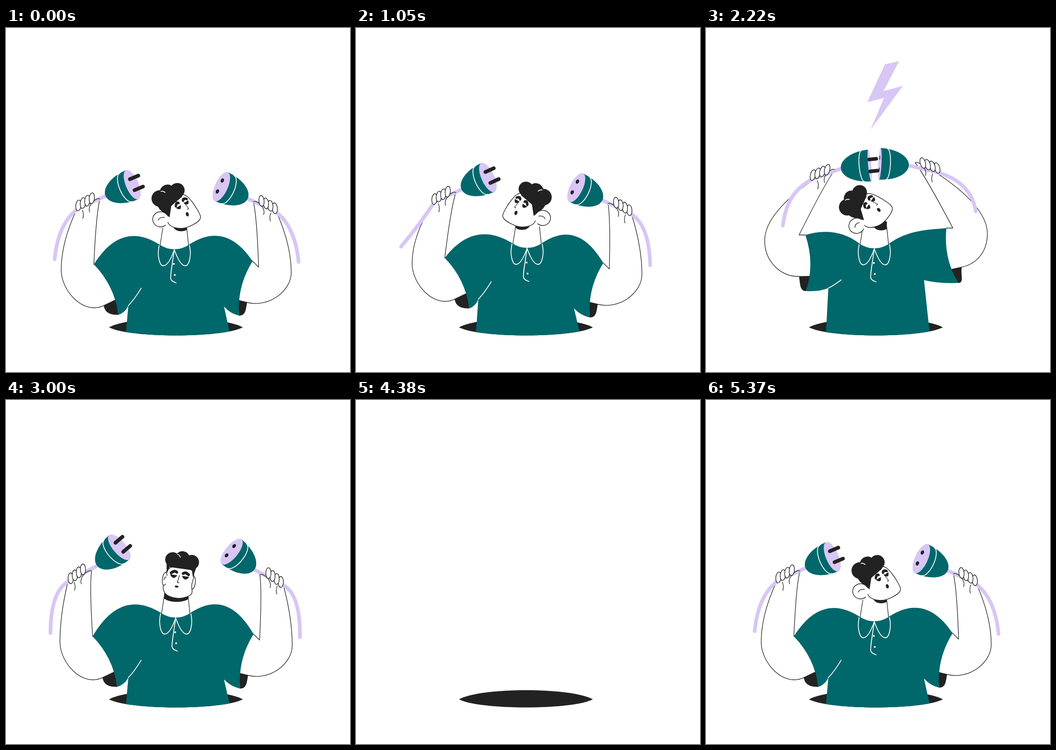
An HTML page with a canvas for the animation above (5.4 s loop, 748 by 748 pixels).

```html
<!DOCTYPE html>
<html lang="en">
<head>
<meta charset="utf-8">
<title>Plug and socket</title>
<style>
html, body { margin: 0; width: 100%; height: 100%; overflow: hidden; background: #fff; }
canvas { display: block; width: 748px; height: 748px; }
</style>
</head>
<body>
<canvas id="stage" width="748" height="748"></canvas>
<script>
const ctx = document.getElementById('stage').getContext('2d');
const TEAL = '#00676b', DARK = '#222222', LILAC = '#d8c6f4', WHITE = '#ffffff';
const LOOP = 5400, STEP = 30, MIRROR = 740, RAD = Math.PI / 180;
const UPPER_ARM = 71, SLEEVE = 122, REACH = 109, WIRE = 141;

// The right side is drawn mirrored, so both arms share one set of rules.
const LEFT = { slack: 0, lean: 26, cuff: 20, hem: 261 };
const RIGHT = { slack: 13, lean: 14, cuff: 10, hem: 254 };

// A hand position, the direction it points the plug, and the swing of the loose wire.
const arm = (x, y, aim, swing) => ({ x, y, aim, swing });
const pose = (left, right, body) => ({ left, right, body: { neck: 473, turn: 0, tilt: 0, drop: 0, width: 1, ...body } });
const vary = (base, change) => Object.fromEntries(Object.keys(base).map(k => [k, { ...base[k], ...change[k] }]));

const lookRight = pose(arm(172, 378, -20, 28), arm(170, 384, -21, 28), { neck: 481, turn: 1 });
const lookLeft = pose(arm(185, 364, -21, 38), arm(160, 388, -22, 25), { neck: 478, turn: -1 });
const joined = pose(arm(248, 314, -8, 35), arm(253, 299, -2, 45), { neck: 479, turn: 1, tilt: -25 });
const apart = pose(arm(154, 378, -32, 24), arm(156, 386, -31, 23), { tilt: 8 });
const facing = pose(arm(180, 365, -24, 34), arm(173, 376, -28, 33), { neck: 468 });
const reach = pose(arm(205, 345, -35, 30), arm(205, 345, -35, 30), { neck: 462, width: 0.95 });
const burst = pose(arm(130, 340, -30, 45), arm(130, 340, -30, 45), { neck: 460 });
const sunk = vary(reach, { body: { drop: 450, width: 0.5 } });

const TIMELINE = [
  [0, lookRight],
  [120, lookRight],
  [420, vary(lookRight, { body: { turn: 0.5 }, right: { x: 160, swing: 41 } })],
  [750, vary(lookLeft, { left: { swing: 51 } })],
  [1050, lookLeft],
  [1170, vary(lookLeft, { left: { swing: 32 } })],
  [1590, joined],
  [1800, vary(joined, { body: { neck: 477 }, left: { x: 240 }, right: { x: 245 } })],
  [2220, joined],
  [2310, joined],
  [2760, vary(apart, { left: { swing: 27 }, right: { swing: 27 } })],
  [3000, apart],
  [3180, apart],
  [3480, facing],
  [3660, reach],
  [3990, sunk],
  [4560, sunk],
  [4800, burst],
  [5040, vary(lookRight, { body: { neck: 484 }, left: { swing: 24 } })],
  [5220, lookRight],
  [LOOP, lookRight]
];

const mix = (a, b, k) => a + (b - a) * k;
const clamp = (v, lo = 0, hi = 1) => Math.max(lo, Math.min(hi, v));
const ease = k => k * k * (3 - 2 * k);
const polar = (x, y, length, degrees) => [x + length * Math.cos(degrees * RAD), y + length * Math.sin(degrees * RAD)];
const blend = (a, b, k) => typeof a === 'number' ? mix(a, b, k)
  : Object.fromEntries(Object.keys(a).map(key => [key, blend(a[key], b[key], k)]));

function poseAt(t) {
  const i = TIMELINE.findIndex(([end]) => end > t);
  const [t0, from] = TIMELINE[i - 1], [t1, to] = TIMELINE[i];
  return blend(from, to, ease((t - t0) / (t1 - t0)));
}

// Everything else about an arm follows from where its hand is.
function joints(hand, side) {
  const { x, y, aim, swing } = hand;
  const raised = clamp((x - 190) / 60);
  const cx = 190 + 0.15 * (x - 165), cy = y + 136;
  const sx = cx + mix(side.slack, 14, raised), sy = cy - side.slack * (1 - raised);
  const slope = side.lean - 26 * raised;
  const [tx, ty] = polar(sx, sy, SLEEVE, 90 - slope);
  const [px, py] = polar(x, y, REACH, aim);
  const [wx, wy] = polar(x, y, WIRE, 90 + swing);
  // A point by the sleeve opening: distance back from the tip, then across.
  const cuff = (back, across) => [
    tx - back * Math.sin(slope * RAD) + across * Math.cos(slope * RAD),
    ty - back * Math.cos(slope * RAD) - across * Math.sin(slope * RAD)
  ];
  return {
    ...side, x, y, cx, cy, sx, sy, tx, ty, px, py, wx, wy,
    ex: cx - UPPER_ARM - 4 * raised, ey: cy + 12,
    kx: 266, ky: ty - 20 + 14 * raised,
    fold: 17 + 48 * Math.sin(slope * RAD),
    bend: cuff(SLEEVE / 2, 20),
    low: cuff(32, -mix(side.cuff, 15, raised)),
    meet: cuff(32, 10),
    angle: Math.min(-3, 1.45 * aim + 6),
    bow: mix(1 - 0.1 * (swing - 27), 1, raised)
  };
}

function fill(color) { ctx.fillStyle = color; ctx.fill(); }
function stroke(color, width) { ctx.strokeStyle = color; ctx.lineWidth = width; ctx.stroke(); }
function ellipse(x, y, rx, ry, rot = 0, from = 0, to = 360) {
  ctx.beginPath();
  ctx.ellipse(x, y, rx, ry, rot * RAD, from * RAD, to * RAD);
}
function line(...points) {
  ctx.beginPath();
  points.forEach(p => ctx.lineTo(...p));
}
function quad(a, b, c) {
  ctx.beginPath();
  ctx.moveTo(...a);
  ctx.quadraticCurveTo(...b, ...c);
}
function smooth(points) {
  const n = points.length, at = i => points[(i + n) % n];
  ctx.beginPath();
  ctx.moveTo(...points[0]);
  for (let i = 0; i < n; i++) {
    const [p, a, b, q] = [at(i - 1), at(i), at(i + 1), at(i + 2)];
    ctx.bezierCurveTo(a[0] + (b[0] - p[0]) / 6, a[1] + (b[1] - p[1]) / 6,
      b[0] - (q[0] - a[0]) / 6, b[1] - (q[1] - a[1]) / 6, b[0], b[1]);
  }
}
function group(draw) { ctx.save(); draw(); ctx.restore(); }
function mirrored(draw) {
  group(() => {
    ctx.translate(MIRROR, 0);
    ctx.scale(-1, 1);
    draw();
  });
}

function drawArm({ x, y, cx, cy, ex, ey, sx, sy, tx, ty, low, meet }) {
  ctx.beginPath();
  ctx.moveTo(...low);
  ctx.bezierCurveTo(low[0] + 3, low[1] + 18, tx - 14, ty, tx, ty);
  ctx.lineTo(...meet);
  fill(DARK);

  const wristX = x - 20, wristY = y + 20, thumbX = x + 32, thumbY = y - 6;
  const dx = meet[0] - low[0], dy = meet[1] - low[1];
  const pull = 0.52 * (low[0] - ex) / Math.hypot(dx, dy);
  const outer = () => {
    ctx.moveTo(wristX, wristY);
    ctx.bezierCurveTo(mix(wristX, ex, 0.55), mix(wristY, ey, 0.3), ex, mix(wristY, ey, 0.66), ex, ey);
    ctx.bezierCurveTo(ex, mix(ey, low[1], 0.6), low[0] - pull * dx, low[1] - pull * dy, ...low);
    ctx.lineTo(...meet);
  };
  const inner = () => {
    ctx.lineTo(sx, sy);
    ctx.lineTo(cx, cy);
    ctx.quadraticCurveTo(mix(thumbX, cx, 0.25) - 5, mix(thumbY, cy, 0.25), thumbX, thumbY);
  };
  ctx.beginPath();
  outer();
  inner();
  ctx.lineTo(x, y);
  fill(WHITE);
  for (const side of [outer, inner]) {
    ctx.beginPath();
    side();
    stroke(DARK, 1.3);
  }
}

function drawShirtHalf({ sx, sy, tx, ty, kx, ky, bend, hem }, nx, ny) {
  const neckX = nx - 32, neckY = ny - 10, lift = ny - 40;
  ctx.beginPath();
  ctx.moveTo(nx + 1, ny);
  ctx.quadraticCurveTo(nx - 18, ny, neckX, neckY);
  ctx.bezierCurveTo(mix(sx, neckX, 0.67), lift, mix(sx, neckX, 0.32), lift, sx, sy);
  ctx.quadraticCurveTo(...bend, tx, ty);
  ctx.quadraticCurveTo((tx + kx) / 2 + 4, (ty + ky) / 2 + 5, kx, ky);
  ctx.lineTo(hem, 660);
  ctx.lineTo(hem, 690);
  ctx.lineTo(nx + 1, 690);
  fill(TEAL);
}

function drawCollar(nx, ny, { kx, ky, fold }) {
  group(() => {
    ctx.translate(nx, ny + 1);
    for (const s of [-1, 1]) {
      ctx.beginPath();
      ctx.moveTo(33 * s, -9);
      ctx.bezierCurveTo(38 * s, 13, 32 * s, 35, 24 * s, 35);
      ctx.bezierCurveTo(14 * s, 35, 6 * s, 17, 0, 0);
      stroke(WHITE, 1.8);
      ellipse(-s, 43 - 12 * s, 2, 2);
      fill(WHITE);
    }
    ctx.beginPath();
    ctx.bezierCurveTo(-4, 28, -8, 50, -8, 62);
    ctx.moveTo(0, 0);
    ctx.bezierCurveTo(-4, 28, -8, 50, -8, 62);
    ctx.quadraticCurveTo(-7, 69, 4, 72);
    stroke(WHITE, 1.8);
  });
  quad([kx, ky], [kx + 13, ky - fold * 0.35], [kx + 28, ky - fold]);
  stroke(WHITE, 1.8);
}

function drawNeck(nx, ny, turn) {
  const k = Math.abs(turn);
  const edge = s => [[nx + 31 * s, ny - 8], [nx + 1 + 26 * s, ny - 46], [nx + 1 + 27 * s, ny - 70]];
  group(() => {
    line(...edge(-1), ...edge(1).reverse(), [nx, ny + 4]);
    fill(WHITE);
    ctx.clip();
    ellipse(nx + 2 + 13 * turn, ny - mix(47, 50, k), mix(30, 17, k), mix(13, 11, k));
    fill(DARK);
  });
  for (const s of [-1, 1]) {
    line(...edge(s).slice(0, 2));
    stroke(DARK, 1.3);
  }
}

function drawHair(k) {
  ctx.translate(-15 * k, mix(-75, -70, k));
  ctx.rotate(-25 * k * RAD);
  line([-33, 9], [-31, 23], [-29 + 10 * k, 33 + 14 * k], [-25 + 20 * k, 18 + 8 * k],
    [24, 18], [28, 33 - 20 * k], [33, 9]);
  fill(DARK);
  for (const i of [-1, 0, 1]) {
    ellipse(21 * i, -4 + 5 * i * i, 16 + k * (1 - i), 16 + k * (1 - i));
    fill(DARK);
  }
  quad([-12, -12], [-7, -11], [-5, -6]);
  stroke(WHITE, 1.6);
}

function drawFeatures(k) {
  ctx.translate(mix(-1, 17, k), mix(-38, -45, k));
  ctx.rotate(-32 * k * RAD);
  ctx.scale(mix(1, 0.75, k), 1);
  for (const s of [-1, 1]) {
    const x = 13 * s;
    quad([x - 6, -8 - s], [x - s, -14], [x + 6, -9 + s]);
    stroke(DARK, 6);
    quad([x - 7, -3], [x + 1, 8], [x + 7, -3]);
    ctx.closePath();
    fill(DARK);
    stroke(DARK, 1.2);
  }
  line([7 * k, -4], [-3 + 12 * k, 12], [1 + 4 * k, 12]);
  stroke(DARK, 1.4);
  ellipse(-3, 21, 4, mix(2.3, 5, k), 35 * k);
  fill(DARK);
}

function drawHead(nx, ny, turn, tilt) {
  const k = Math.abs(turn);
  ctx.translate(nx + 2, ny - 38);
  ctx.rotate(tilt * RAD);
  ctx.translate(0, -12);
  if (turn < 0) ctx.scale(-1, 1);

  ellipse(mix(30, 16, k), mix(-30, -40, k), 5, mix(14, 6, k));
  fill(WHITE);
  stroke(DARK, 1.4);

  const front = [[28, -52], [28, -25], [29, -4], [0, 8], [-30, -3], [-30, -48], [0, -64]];
  const side = [[24, -66], [48, -36], [53, -14], [20, 4], [-10, -1], [-17, -22], [2, -64]];
  smooth(front.map(([x, y], i) => [mix(x, side[i][0], k), mix(y, side[i][1], k)]));
  fill(WHITE);
  stroke(DARK, 1.4);
  group(() => drawHair(k));

  ctx.save();
  ctx.translate(-32, mix(-30, -15, k));
  const earW = mix(5, 17, k), earH = mix(14, 16.5, k);
  ellipse(0, 0, earW, earH);
  fill(WHITE);
  ellipse(0, 0, earW, earH, 0, 50, 325);
  stroke(DARK, 1.4);
  quad([-0.3 * earW, 2], [-0.1 * earW, -6], [0.5 * earW, -4]);
  stroke(DARK, 1.3);
  ctx.restore();
  group(() => drawFeatures(k));
}

function drawPlug({ px, py, angle }, hasProngs) {
  const face = clamp(-0.6 * angle, 3.5, 14);
  ctx.translate(px, py);
  ctx.rotate(angle * RAD);
  ellipse(0, 0, 63, 34.5, 0, 90, 270);
  fill(TEAL);
  ellipse(-15, 0, Math.max(8, face), 33.5, 0, 90, 270);
  stroke(WHITE, 1.8);
  ellipse(0, 0, face, 34.5);
  fill(LILAC);
  for (const y of [-13, 13]) {
    if (hasProngs) {
      line([0, y], [mix(14, 20, face / 14), y]);
      stroke(DARK, 8);
    } else {
      ellipse(0.25 * face, y, 0.25 * face, 4.8);
      fill(DARK);
    }
  }
}

function drawGrip(m, hasProngs) {
  const { x, y, px, py, wx, wy, angle, bow } = m;
  const ax = x - 14, ay = y + 14;
  ctx.beginPath();
  ctx.moveTo(...polar(px, py, -60, angle));
  ctx.lineTo(ax, ay);
  ctx.quadraticCurveTo(mix((ax + wx) / 2, mix(wx, ax, 0.12), bow), mix((ay + wy) / 2, mix(ay, wy, 0.25), bow), wx, wy);
  stroke(LILAC, 8);
  group(() => drawPlug(m, hasProngs));

  ctx.translate(x, y);
  ctx.beginPath();
  ctx.moveTo(32, -6);
  ctx.bezierCurveTo(24, -11, 4, 8, 10, 22);
  stroke(DARK, 1.3);
  quad([-6, 18], [-2, 27], [-5, 36]);
  stroke(DARK, 1.3);
  ctx.rotate((0.45 * angle - 18) * RAD);
  for (let i = -1.5; i < 2; i++) {
    ellipse(11 * i, 0, 5.7, 11.8, 35);
    fill(WHITE);
    stroke(DARK, 1.4);
  }
}

function holeCurve(y, back) {
  ctx.bezierCurveTo(back ? 469 : 270, y, back ? 270 : 469, y, back ? 224 : 515, 651);
}

function drawHole() {
  ctx.beginPath();
  ctx.moveTo(224, 651);
  holeCurve(624.3, false);
  holeCurve(674.3, true);
  fill(DARK);
}

function clipToHole() {
  line([0, 651], [0, 0], [748, 0], [748, 651], [515, 651]);
  holeCurve(674.3, true);
  ctx.clip();
}

function drawBolt(t) {
  const size = clamp(Math.min((t - 1590) / 120, (2430 - t) / 90));
  ctx.translate(390, 146);
  ctx.scale(size, size);
  line([-1, -67], [30, -74], [-4, -9], [38, -20], [-32, 75], [-3, 6], [-39, 15]);
  fill(LILAC);
}

function drawMan({ body, left, right }) {
  const { neck, turn, tilt, drop, width } = body;
  const nx = 369 - 3 * turn;
  const near = joints(left, LEFT), far = joints(right, RIGHT);
  clipToHole();
  ctx.translate(370 * (1 - width), drop);
  ctx.scale(width, 1);
  drawArm(near);
  mirrored(() => drawArm(far));
  drawNeck(nx, neck, turn);
  drawShirtHalf(near, nx, neck);
  mirrored(() => drawShirtHalf(far, MIRROR - nx, neck));
  drawCollar(nx, neck, near);
  group(() => drawHead(nx, neck, turn, tilt));
  mirrored(() => drawGrip(far, false));
  group(() => drawGrip(near, true));
}

function draw(t) {
  const p = poseAt(t);
  ctx.fillStyle = WHITE;
  ctx.fillRect(0, 0, 748, 748);
  ctx.lineCap = ctx.lineJoin = 'round';
  drawHole();
  group(() => drawBolt(t));
  if (p.body.drop < 440) group(() => drawMan(p));
}

const start = performance.now();
function tick() {
  const t = (performance.now() - start) % LOOP;
  draw(Math.floor(t / STEP) * STEP);
  requestAnimationFrame(tick);
}
tick();
</script>
</body>
</html>
```
